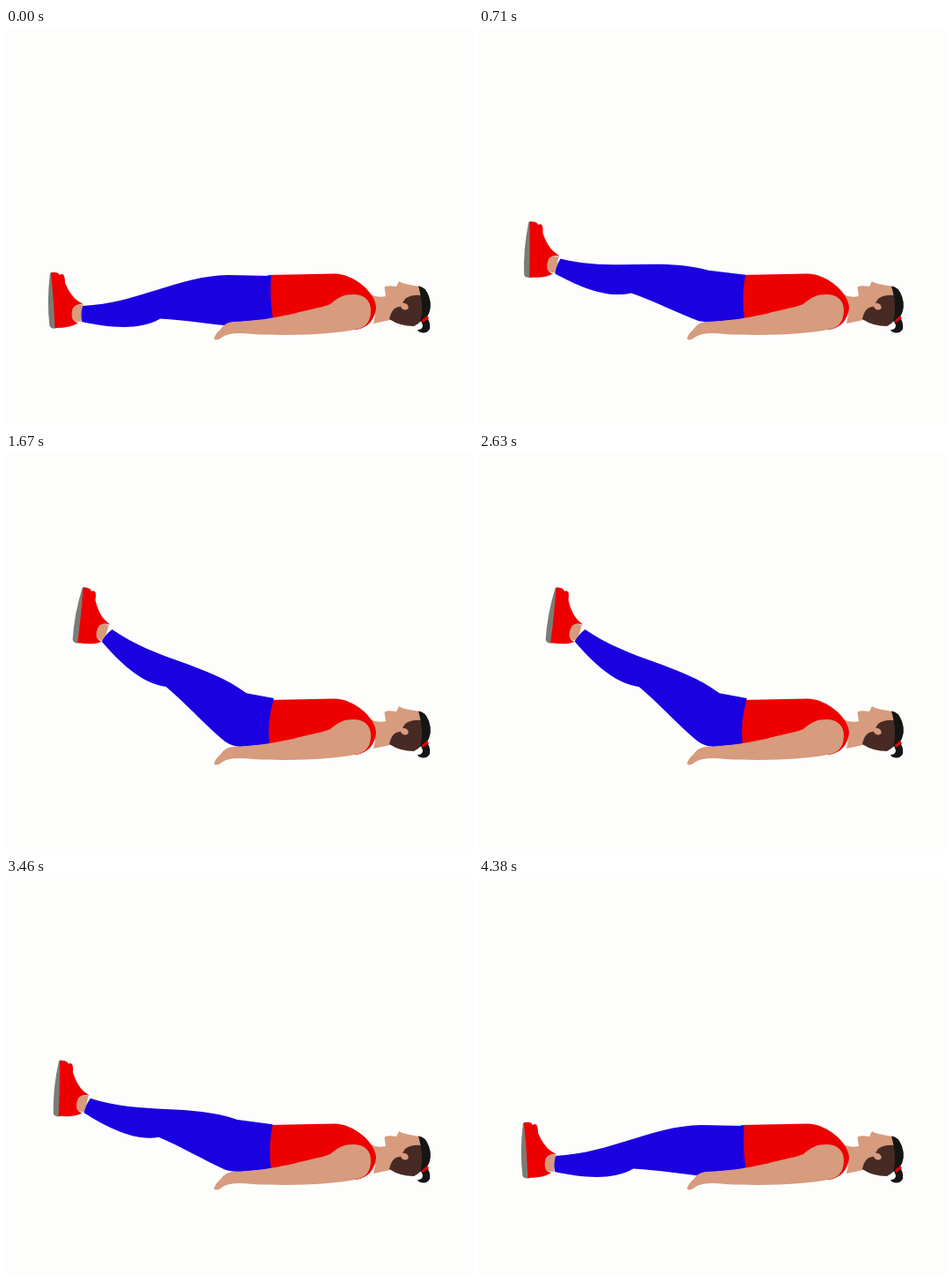
An HTML page with a canvas for the animation above (4420 ms loop, 530 by 450 pixels).

```html
<!DOCTYPE html>
<html lang="en">
<head>
<meta charset="utf-8">
<title>Leg raise</title>
<style>
  html, body { margin: 0; width: 100%; height: 100%; overflow: hidden; background: #fdfdfc; }
  canvas { display: block; }
</style>
</head>
<body>
<canvas id="stage" width="530" height="450"></canvas>
<script>
const ctx = document.getElementById('stage').getContext('2d');
const LOOP = 4420;
const RAD = Math.PI / 180;
const HIP = { x: 274, y: 307, swing: 37.3 * RAD };
const ANKLE = { x: 82, y: 326, swing: 10 * RAD };
const COLORS = {
  paper: '#fdfdfc', skin: '#d79b7e', red: '#ee0000', blue: '#1b00e0',
  sole: '#7c7c76', hair: '#482a24', black: '#151514'
};

// Upper body, at rest throughout
const shirt = new Path2D('M297 280 L372 278.5 C394 278 420 300 420 317 C419 330 411 340 397 342 L297 336 Z');
const arm = new Path2D('M236 352 Q238 346 243 342 Q248 334 257 333 C290 332 310 327 326 324 C342 319 355 318 368 313 C377 305 384 302 394 302 C407 302 414 309 414 320 C414 331 410 338 400 341 C370 348 320 349 280 347 Q255 344 246 350 Q238 356 236 352 Z');
const head = new Path2D('M414 302 Q421 306 431 304 L429.5 294 Q431 291 443 293 L446 287 Q449 290 470 293 L474 312 L452 330 L436 331 L417 335 Q422 320 414 302 Z');
const hair = new Path2D('M453 307 Q460 302 471 303 L476 320 Q473 334 463 338 Q447 338 435 330 Q438 316 447 316 Z');
const ear = new Path2D('M445 313 Q450 310 455 313 Q459 318 454 319.5 Q450 320 448 316 Z');
const cap = new Path2D('M468 292.5 Q476 293 480 304 Q485 318 477 329 L470 333 Q475 317 468 292.5 Z');
const tail = new Path2D('M477 327 Q482 333 481 341 Q478 346 473 345.5 Q468 345 467 342 Q473 342 473 337 L471 332 Z');
const band = new Path2D('M472 331 L478 326 L480 329 L473 334 Z');

// Foot as it stands with the legs on the floor
const ankle = new Path2D('M73 314 L87 314 L85 333 L73 332 Z');
const sole = new Path2D('M50 278 Q46 310 49.5 338 Q52 342 58 340 V300 L56 278 Q52 275 50 278 Z');
const shoe = new Path2D('M51 278 Q58 275 61 280 Q67 276 67 289 Q73 303 81 309 L88 313.5 Q76 312 75 321 Q73 333 82 334 Q74 340 55.5 340 Q54 306 51 278 Z');

function fill(path, color) {
  ctx.fillStyle = COLORS[color];
  ctx.fill(path);
}

function turn(joint, angle) {
  ctx.translate(joint.x, joint.y);
  ctx.rotate(angle);
  ctx.translate(-joint.x, -joint.y);
}

// The leg swings on the hip; the foot bends back to stay nearly upright
function drawFoot(lift, draw) {
  ctx.save();
  turn(HIP, HIP.swing * lift);
  turn(ANKLE, (ANKLE.swing - HIP.swing) * lift);
  draw();
  ctx.restore();
}

function drawTrousers(lift) {
  ctx.beginPath();
  ctx.save();
  turn(HIP, HIP.swing * lift);
  ctx.moveTo(252, 280);
  ctx.bezierCurveTo(195, 281, 150, 312, 87, 315);
  ctx.quadraticCurveTo(84.5, 324, 86, 333);
  ctx.bezierCurveTo(115, 339, 150, 344, 175, 329.5);
  ctx.bezierCurveTo(205, 331, 230, 336, 258, 338);
  ctx.restore();
  // Seat and waistband stay with the body
  ctx.quadraticCurveTo(254, 333, 266, 333);
  ctx.lineTo(303 - 4 * lift, 330);
  ctx.quadraticCurveTo(299 - 3 * lift, 306, 301 + 3 * lift, 281 - 3 * lift);
  ctx.closePath();
  ctx.fillStyle = COLORS.blue;
  ctx.fill();
}

function drawLeg(lift) {
  drawFoot(lift, () => fill(ankle, 'skin'));
  drawTrousers(lift);
  drawFoot(lift, () => {
    fill(sole, 'sole');
    fill(shoe, 'red');
  });
}

const ease = u => (1 - Math.cos(Math.PI * Math.max(0, Math.min(1, u)))) / 2;
const liftAt = t => ease((t - 80) / 1360) - ease((t - 2610) / 1800);

function frame() {
  ctx.fillStyle = COLORS.paper;
  ctx.fillRect(0, 0, 530, 450);
  fill(head, 'skin');
  fill(hair, 'hair');
  fill(ear, 'skin');
  fill(tail, 'black');
  fill(cap, 'black');
  fill(band, 'red');
  fill(shirt, 'red');
  drawLeg(liftAt(performance.now() % LOOP));
  fill(arm, 'skin');
  requestAnimationFrame(frame);
}
frame();
</script>
</body>
</html>
```
